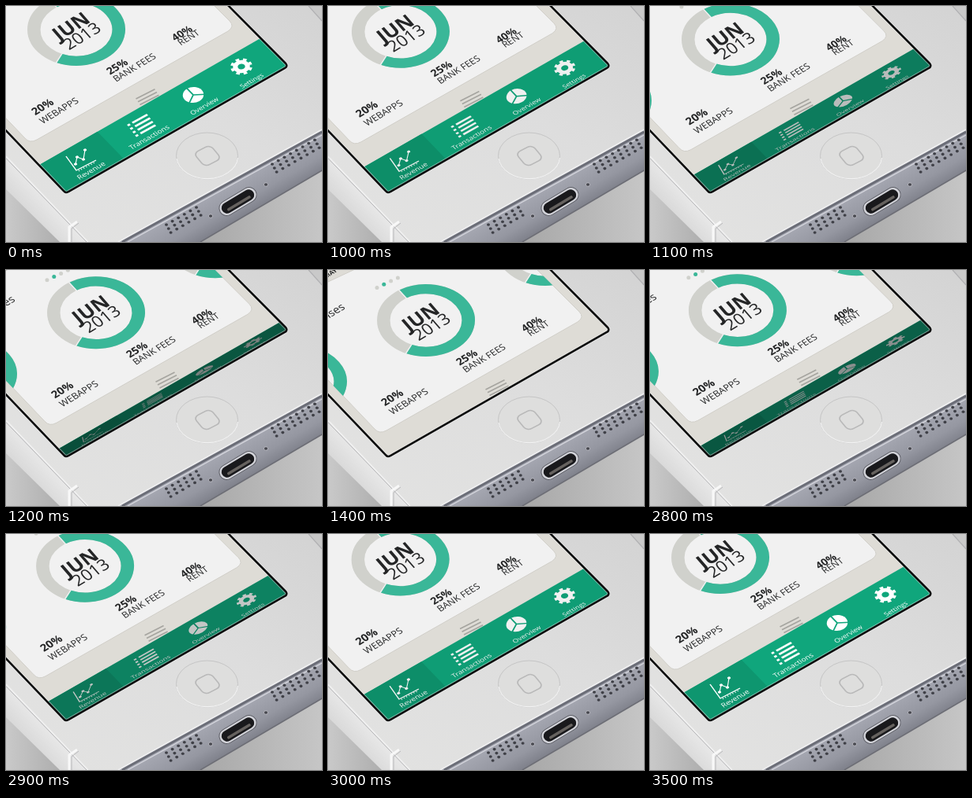
Recreate the animation shown at these times as an HTML page. Size 400 px wide and 300 px high, loop 3.55 s.

```html
<!DOCTYPE html>
<html lang="en">
<head>
<meta charset="utf-8">
<title>Folding menu</title>
<style>
html, body { margin: 0; width: 100%; height: 100%; overflow: hidden; background: #bbb; }
svg { display: block; width: 100vw; height: 100vh; }
text { font-family: "Open Sans", "Noto Sans", sans-serif; }
.bold { font-weight: 700; }
</style>
</head>
<body>
<svg viewBox="0 0 400 300" preserveAspectRatio="none">
  <defs>
    <linearGradient id="floor" x1="0" y1="0" x2="1" y2="0">
      <stop offset="0" stop-color="#c9c9c9"/><stop offset=".2" stop-color="#a9a9a9"/><stop offset=".6" stop-color="#a6a6a6"/><stop offset="1" stop-color="#c6c6c6"/>
    </linearGradient>
    <linearGradient id="face" x1="0" y1="1" x2="1" y2="0">
      <stop offset="0" stop-color="#e3e3e2"/><stop offset=".6" stop-color="#dddddd"/><stop offset="1" stop-color="#d3d3d3"/>
    </linearGradient>
    <linearGradient id="metal" gradientUnits="userSpaceOnUse" x1="280" y1="226" x2="304" y2="268">
      <stop offset="0" stop-color="#a6a8b2"/><stop offset=".6" stop-color="#9597a1"/><stop offset="1" stop-color="#7d7f89"/>
    </linearGradient>
    <linearGradient id="flank" gradientUnits="userSpaceOnUse" x1="45" y1="235" x2="22" y2="256">
      <stop offset="0" stop-color="#e9e9e9"/><stop offset="1" stop-color="#d9d9d9"/>
    </linearGradient>
    <path id="glass" d="M-30,127 L73,235 Q75.5,238.500 79,236 L353,79 Q357,76.500 354,73 L276,-6 L-30,-6Z"/>
    <path id="card" d="M-55,82 L59,202 Q65,209 74,204 L316,66 Q325,60 318,53 L240,-25 V-98 L-55,41Z"/>
    <clipPath id="glassClip"><use href="#glass"/></clipPath>
    <clipPath id="cardClip"><use href="#card"/></clipPath>
    <g id="ring" fill="none" stroke-width="16.5" transform="scale(1 .742)">
      <circle r="53.7" stroke="#d0d1cc"/>
      <circle r="53.7" stroke="#3ab798" pathLength="360" stroke-dasharray="237 123" transform="rotate(-123)"/>
      <path d="M-24,-37 L-35,-53 M-18,41 L-26,58" stroke="#f1f1f1" stroke-width="1.6"/>
    </g>
  </defs>

  <rect width="400" height="300" fill="url(#floor)"/>
  <!-- phone body -->
  <path d="M0,188 L108,300 H68 L0,233Z" fill="url(#flank)"/>
  <path d="M0,0 H384 L400,18 V158 L142,300 H104 L0,191Z" fill="url(#face)"/>
  <path d="M384,0 L400,18 V0Z" fill="#c9c9c9"/>
  <path d="M383,0 L400,19" stroke="#b0b0b2" stroke-width="1.2"/>
  <path d="M0,191 L104,300" stroke="#f1f1f1" stroke-width="1.6"/>
  <path d="M0,193.500 L102,300" stroke="#b4b4b6" stroke-width="1"/>
  <path d="M90,274 L80,281 V300" fill="none" stroke="#f8f8f8" stroke-width="3"/>
  <path d="M92,276 L83,283 V300" fill="none" stroke="#b9b9bb" stroke-width="1"/>
  <path d="M142,300 L400,158 V209 L246,300Z" fill="url(#metal)"/>
  <path d="M246,300 L400,209" stroke="#6d6e76" stroke-width="1.6"/>
  <path d="M142,300 L400,157" stroke="#f0f0f1" stroke-width="1.6"/>
  <path d="M147,300 L400,160" stroke="#6b6d77" stroke-width="3"/>
  <path d="M154,300 L400,164" stroke="#d6d7de" stroke-width="1.3"/>
  <g id="holes" fill="#3f4047"></g>
  <g fill="#484950" stroke="#c4c5cc" stroke-width=".8">
    <ellipse cx="259" cy="267" rx="2.6" ry="2.300"/><ellipse cx="329" cy="227" rx="2.6" ry="2.300"/>
  </g>
  <g transform="translate(293.5 248.5) rotate(-31)">
    <rect x="-26" y="-9.500" width="52" height="19" rx="9.500" fill="#d3d4da" stroke="#5d5e66"/>
    <rect x="-23" y="-7" width="46" height="14" rx="7" fill="#19191c"/>
    <rect x="-17" y="1" width="34" height="3.500" rx="1.500" fill="#66625f"/>
  </g>
  <!-- home button -->
  <ellipse cx="254.5" cy="190.500" rx="39" ry="29.500" fill="#dededd" stroke="#c5c5c5" stroke-width="1"/>
  <path d="M216,194 A39,29.500 0 0 0 293.500,193" fill="none" stroke="#f2f2f2" stroke-width="1.2"/>
  <rect x="-12" y="-12" width="24" height="24" rx="6.500" transform="matrix(.87 -.45 .6 .72 255 190.500)" fill="none" stroke="#b9b9b9" stroke-width="1.7"/>

  <!-- screen -->
  <g clip-path="url(#glassClip)">
    <rect width="400" height="300" fill="#dedcd6"/>
    <g id="page">
      <use href="#card" fill="#f1f1f1" stroke="#d0cec8" stroke-width="1"/>
      <g clip-path="url(#cardClip)" id="cardBody"></g>
      <g id="header"></g>
      <path d="M199.500,152 l24,-12.300 M202,155.800 l24,-12.300 M204.500,159.600 l24,-12.300" stroke="#a6a5a0" stroke-width="1.7"/>
    </g>
    <g id="menu"></g>
  </g>
  <use href="#glass" fill="none" stroke="#f4f4f4" stroke-width="4.400" opacity=".5"/>
  <use href="#glass" fill="none" stroke="#0c0d0d" stroke-width="2.600"/>
</svg>
<script>
const NS = "http://www.w3.org/2000/svg";
const $ = id => document.getElementById(id);
function add(parent, tag, attrs, label) {
  const el = document.createElementNS(NS, tag);
  for (const key in attrs) el.setAttribute(key, attrs[key]);
  if (label) el.textContent = label;
  parent.append(el);
  return el;
}

// speaker holes
function grille(x, y, cols, dx, dy) {
  for (let r = 0; r < 3; r++)
    for (let c = 0; c < cols; c++)
      add($("holes"), "ellipse", { cx: x + c * dx + r * 2.8, cy: y + c * dy + r * 5, rx: 2, ry: 1.8 });
}
grille(203, 278, 6, 7.6, -4.4);
grille(337, 201, 8, 7.7, -4.4);

// card contents, laid out for the closed menu; text is centred on its point
const body = $("cardBody");
function write(label, x, y, size, weight = "", parent = body) {
  add(parent, "text", {
    transform: `matrix(.862 -.52 .64 .74 ${x} ${y})`, y: .357 * size,
    "font-size": size, "text-anchor": "middle", fill: "#242526", class: weight
  }, label);
}
for (const [x, y] of [[124, 64], [-38, 142], [275, -26]]) {
  add(add(body, "g", { transform: `translate(${x} ${y})` }), "use", { href: "#ring" });
  write("JUN", x - 7, y - 4.5, 25, "bold");
  write("2013", x + 7, y + 8, 21.5);
}
write("20%", 81, 162, 14, "bold");
write("WEBAPPS", 102, 167, 12);
write("25%", 175.5, 111, 13.6, "bold");
write("BANK FEES", 197.5, 112, 11.8);
write("40%", 257.5, 68.5, 13.2, "bold");
write("RENT", 266, 74, 11.6);
write("Expenses", -7, 61, 14);
write("MAY", 3, 4, 8, "bold", $("header"));
for (let i = 0; i < 4; i++)
  add(body, "circle", { cx: 62 + i * 8.8, cy: 22.5 - i * 4.2, r: 2.5, fill: i === 1 ? "#3ab798" : "#d0d1cc" });

// menu plane: x runs along the hinge, y up the screen is negative
const U = [.866, -.498], V = [.62, .645], HINGE = [74.5, 238.5];
const det = U[0] * V[1] - U[1] * V[0];
function local(x, y) {
  const dx = x - HINGE[0], dy = y - HINGE[1];
  return [(dx * V[1] - dy * V[0]) / det, (dy * U[0] - dx * U[1]) / det];
}
const place = (x, y) => `translate(${local(x, y)})`;
const menu = $("menu");
const HEIGHT = 55;
const strip = { x: -20, y: -HEIGHT, width: 380, height: HEIGHT + 8 };
add(menu, "rect", { ...strip, fill: "#10a67c" });
add(menu, "rect", { ...strip, width: 107, fill: "#0e966f" });

const icons = add(menu, "g", { fill: "#fff" });
function caption(label, x, y, size) {
  add(icons, "text", { transform: place(x, y), "font-size": size }, label);
}
caption("Revenue", 93, 221, 9.7);
caption("Transactions", 159, 183, 9.6);
caption("Overview", 236, 139, 9.1);
caption("Settings", 299, 105, 8.7);

const line = (points, width, more) => add(icons, "polyline", {
  points: points.map(p => local(...p)).join(" "), fill: "none", stroke: "#fff", "stroke-width": width, ...more });
line([[76, 191], [89, 209], [114, 196]], 1.4);
line([[92, 209.5], [112, 199]], 2, { "stroke-dasharray": "1 2.5" });
const trend = [[88, 201], [90, 192], [98, 195], [100, 183]];
line(trend, 1.1);
for (const p of trend) add(icons, "circle", { transform: place(...p), r: 2 });

for (let i = 0; i < 4; i++) {
  const x = 154 + i * 3.4, y = 152 + i * 4.5;
  line([[x, y], [x + 3, y - 1.7]], 3);
  line([[x + 6, y - 3.4], [x + 25, y - 14.1]], 3);
}

const pie = add(icons, "g", { transform: place(237, 113) });
add(pie, "circle", { r: 12.4 });
add(pie, "path", { d: "M0,0 V-14 M0,0 L-12,8 M0,0 L12,8", stroke: "#10a67c", "stroke-width": 1.8 });

const gear = add(icons, "g", { transform: place(298, 77), fill: "none", stroke: "#fff" });
add(gear, "circle", { r: 7.3, "stroke-width": 5.8 });
add(gear, "circle", { r: 11.2, "stroke-width": 3.8, pathLength: 16, "stroke-dasharray": "1 1" });

const shade = add(menu, "rect", { ...strip, fill: "#06110d" });

const LOOP = 3550, STEP = 50;
const smooth = t => (t = Math.min(1, Math.max(0, t)), t * t * (3 - 2 * t));
function foldAt(ms) {
  const step = start => Math.floor((ms - start) / STEP) + 1;
  if (ms < 1000) return 0;
  if (ms < 2650) return smooth((step(1000) + .5) / 8.5);
  return 1 - smooth(step(2650) / 9.6);
}
function draw(ms) {
  const fold = foldAt(ms), open = 1 - fold;
  $("page").setAttribute("transform", `translate(${-35 * open} ${-34 * open})`);
  menu.setAttribute("transform", `matrix(${U} ${V} ${HINGE}) scale(1 ${open})`);
  menu.setAttribute("visibility", open < .005 ? "hidden" : "visible");
  shade.setAttribute("opacity", .75 * fold);
}
function tick() {
  draw(performance.now() % LOOP);
  requestAnimationFrame(tick);
}
tick();
</script>
</body>
</html>
```
